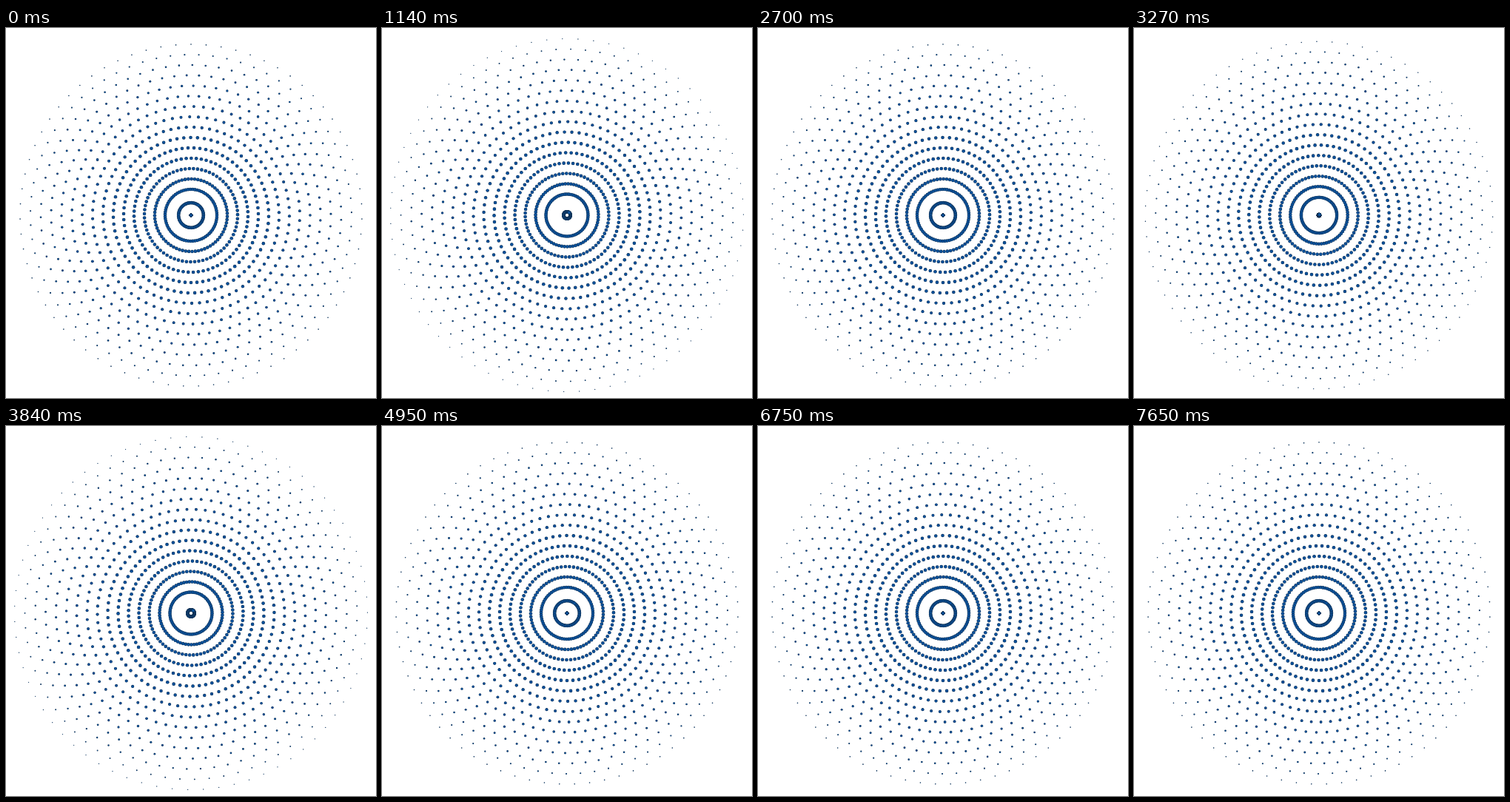
Recreate the animation shown at these times as an HTML page with a canvas. Size 500x500 px, loop 7680 ms.

```html
<!DOCTYPE html>
<html lang="en">
<head>
<meta charset="utf-8">
<title>Radiating dots</title>
<style>
  html, body { margin: 0; width: 100%; height: 100%; overflow: hidden; background: #fff; }
  canvas { display: block; width: 500px; height: 500px; }
</style>
</head>
<body>
<canvas id="stage" width="500" height="500"></canvas>
<script>
const ctx = document.getElementById('stage').getContext('2d');
const RINGS = 17, DOTS = 71, GAP = 14;
const STEP_MS = 30, LOOP_STEPS = 256, RING_STEPS = 15;
const SPACING = 2 * Math.PI / DOTS;
const TWIST = 0.55 * SPACING; // turn while moving out by one ring

const smooth = u => u >= 1 ? 1 : u * u * (3 - 2 * u);
const ringRadius = p => (GAP * p + GAP / 2) * smooth(p / 1.4);
const dotRadius = r => 2.3 * Math.sqrt(Math.min(1, Math.max(0, (250 - r) / 150)));

function disc(x, y, r, color) {
  ctx.fillStyle = color;
  ctx.beginPath();
  ctx.arc(x, y, r, 0, 2 * Math.PI);
  ctx.fill();
}

function drawRing(p) {
  const r = ringRadius(p), size = dotRadius(r);
  const start = -Math.PI / 2 - (p - RINGS + 1) * TWIST;
  for (let i = 0; i < DOTS; i++) {
    const a = start + i * SPACING;
    const x = 250 + r * Math.cos(a), y = 253 + r * Math.sin(a);
    disc(x, y, size, '#12304f');
    disc(x, y, Math.max(0.3, size - 0.45), '#0b519b');
  }
}

function draw(now) {
  const step = Math.floor(now / STEP_MS) % LOOP_STEPS;
  const phase = step % RING_STEPS / RING_STEPS;
  ctx.fillStyle = '#fff';
  ctx.fillRect(0, 0, 500, 500);
  for (let k = 0; k < RINGS; k++) drawRing(k + phase);
}

const begin = performance.now();
function tick() {
  draw(performance.now() - begin);
  requestAnimationFrame(tick);
}
tick();
</script>
</body>
</html>
```
